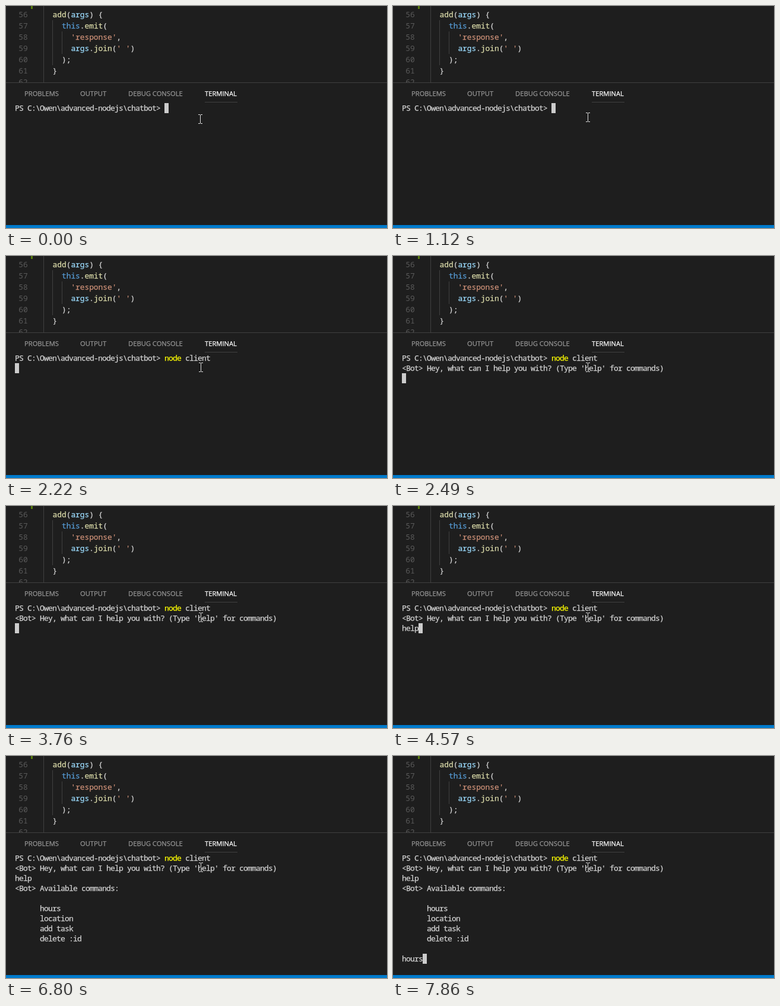
Write an HTML page that moves like this. It is 642x375 px and loops after 8 s.

```html
<!DOCTYPE html>
<html lang="en">
<head>
<meta charset="utf-8">
<title>Terminal</title>
<style>
  html, body { margin: 0; width: 100%; height: 100%; overflow: hidden; background: #1e1e1e; }
  svg { display: block; }
  text { white-space: pre; }
  tspan, .tabs text { stroke: currentColor; stroke-width: .25px; fill: currentColor; }
  .code, .term { font-family: "Noto Sans Mono", "DejaVu Sans Mono", monospace; color: #d4d4d4; }
  .code { font-size: 12.833px; }
  .term { font-size: 13px; letter-spacing: -.8px; }
  .tabs { font: 11.2px "Open Sans", "Noto Sans", sans-serif; color: #969696; }
  .num { color: #5a5a5a; stroke: none; }
  .fn { color: #dcdcaa; }
  .var { color: #9cdcfe; }
  .key { color: #569cd6; }
  .str { color: #ce9178; }
  .cmd { color: #ffff00; }
  .on { color: #fff; }
  .line { stroke: #404040; }
  #pointer { stroke: #fff; fill: none; mix-blend-mode: difference; }
</style>
</head>
<body>
<svg width="642" height="375" viewBox="0 0 642 375">
  <rect width="642" height="375" fill="#1e1e1e"/>
  <rect x="42" width="3" height="5" fill="#587c0c"/>
  <path class="line" d="M63.5 0V129M78.5 24V100M94.5 43V81"/>
  <g id="code" class="code"></g>
  <rect y="129" width="642" height="241" fill="#1e1e1e"/>
  <path class="line" d="M0 129.5H642M335 162.5H390"/>
  <g class="tabs">
    <text x="31" y="152">PROBLEMS</text>
    <text x="125" y="152">OUTPUT</text>
    <text x="206" y="152">DEBUG CONSOLE</text>
    <text x="335" y="152" class="on">TERMINAL</text>
  </g>
  <g id="term" class="term"></g>
  <rect id="cursor" width="7" height="17" fill="#ccc"/>
  <rect y="370" width="642" height="5" fill="#007acc"/>
  <path id="pointer" d="M0 .5h3m1 0h3M3.5 1v14M0 15.5h3m1 0h3"/>
</svg>
<script>
const $ = id => document.getElementById(id);
const NS = 'http://www.w3.org/2000/svg';
const LOOP = 8000, LEFT = 15, TOP = 164, CELL = 7, ROW = 17;

// Adds a line of text made of [string, class] parts.
function addText(parent, x, y, ...parts) {
  const line = parent.appendChild(document.createElementNS(NS, 'text'));
  line.setAttribute('x', x);
  line.setAttribute('y', y);
  for (const [string, style] of parts) {
    const span = line.appendChild(document.createElementNS(NS, 'tspan'));
    span.textContent = string;
    if (style) span.setAttribute('class', style);
  }
  return line;
}

const source = [
  [0, ['add', 'fn'], ['('], ['args', 'var'], [') {']],
  [2, ['this', 'key'], ['.'], ['emit', 'fn'], ['(']],
  [4, ["'response'", 'str'], [',']],
  [4, ['args', 'var'], ['.'], ['join', 'fn'], ['('], ["' '", 'str'], [')']],
  [2, [');']],
  [0, ['}']],
  [0]
];
source.forEach(([indent, ...parts], i) => {
  const y = 19 + 19 * i;
  addText($('code'), 21.2, y, [56 + i, 'num']);
  addText($('code'), 78.6 + indent * 7.7, y, ...parts);
});

const prompt = 'PS C:\\Owen\\advanced-nodejs\\chatbot> ';
const log = [
  'node client',
  "<Bot> Hey, what can I help you with? (Type 'help' for commands)",
  'help',
  '<Bot> Available commands:',
  '',
  '      hours',
  '      location',
  '      add task',
  '      delete :id',
  '',
  'hours'
];
const rows = log.map((_, i) => {
  const parts = i ? [['']] : [[prompt], ['', 'cmd'], ['']];
  return addText($('term'), LEFT, TOP + 13 + ROW * i, ...parts).children;
});

// When the cursor reaches each row, and how typing goes there:
// `first` characters appear at `from`, then `rate` more on every tick.
const stages = [
  { at: 0, row: 0, from: 1400, tick: 137, first: 3, rate: 1.75 },
  { at: 2220, row: 1 },
  { at: 2490, row: 2, from: 4040, tick: 250, first: 1, rate: 1.5 },
  { at: 4970, row: 10, from: 7480, tick: 120, first: 1, rate: 1.4 }
];
const blinks = [[590, 1120], [3020, 3760], [5680, 6240], [6800, 7480]];

function typedCount(stage, t) {
  if (!(t >= stage.from)) return 0;
  const ticks = Math.floor((t - stage.from) / stage.tick);
  return Math.min(log[stage.row].length, Math.floor(stage.first + stage.rate * ticks));
}

function draw() {
  const t = performance.now() % LOOP;
  const stage = stages.findLast(s => s.at <= t);
  const { row } = stage, typed = typedCount(stage, t);

  log.forEach((line, i) => {
    const text = line.slice(0, i < row ? line.length : i > row ? 0 : typed);
    if (i) {
      rows[i][0].textContent = text;
    } else {
      rows[0][1].textContent = text.slice(0, 4);
      rows[0][2].textContent = text.slice(4);
    }
  });

  const column = typed + (row ? 0 : prompt.length);
  const hidden = blinks.some(([off, on]) => t >= off && t < on);
  $('cursor').setAttribute('x', LEFT + CELL * column);
  $('cursor').setAttribute('y', TOP + ROW * row);
  $('cursor').setAttribute('opacity', hidden ? 0 : 1);
  $('pointer').setAttribute('transform', t < 160 ? 'translate(324 183)' : 'translate(325 180)');
  requestAnimationFrame(draw);
}
draw();
</script>
</body>
</html>
```
